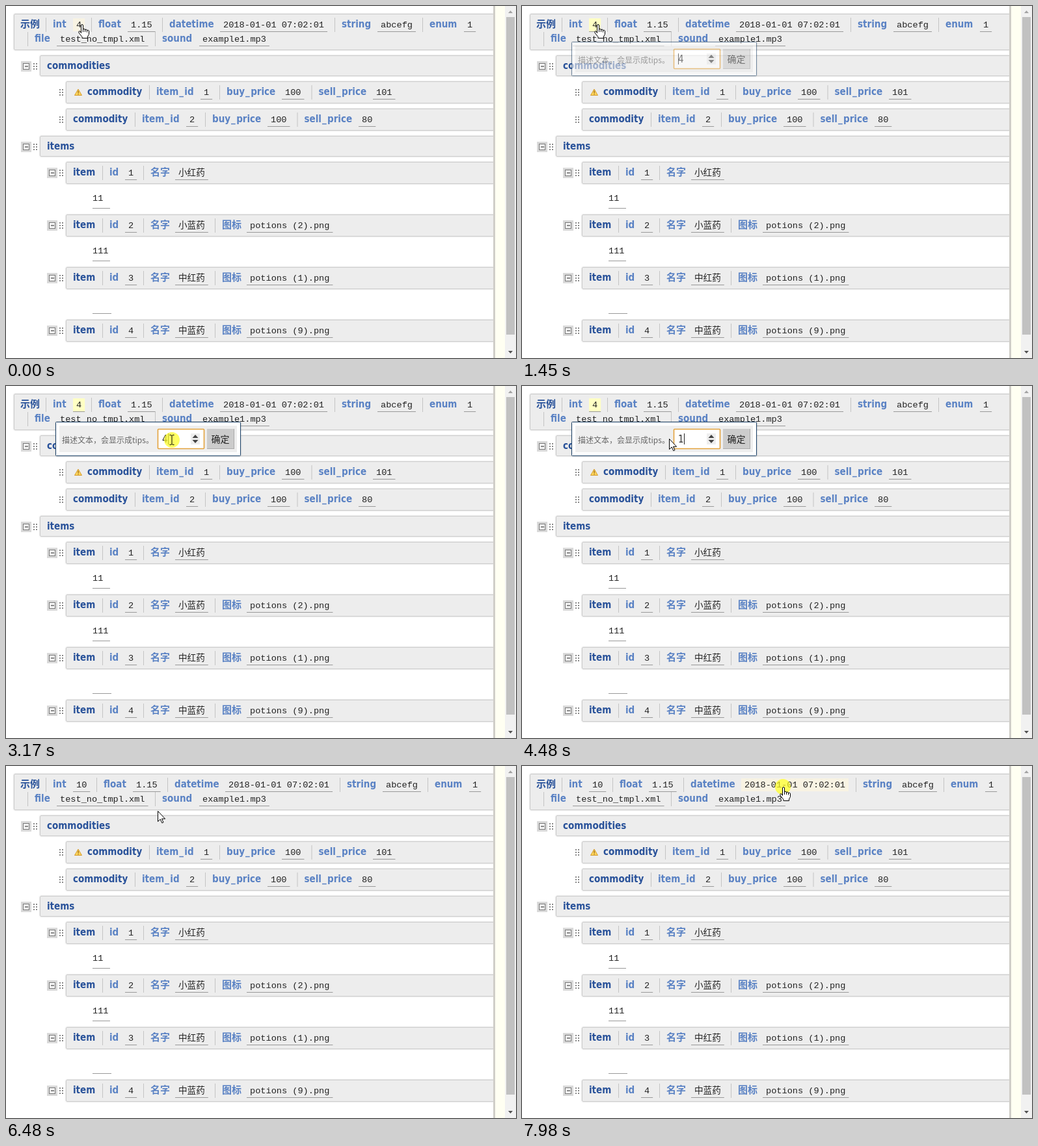
Recreate the animation shown at these times as an HTML page. Size 784 by 542 pixels, loop 8000 ms.

```html
<!DOCTYPE html>
<html lang="zh">
<head>
<meta charset="utf-8">
<style>
html, body { margin: 0; width: 100%; height: 100%; overflow: hidden; background: #fff; }
svg { display: block; }
text { white-space: pre; font-family: "DejaVu Sans Condensed", "Noto Sans", "Noto Sans CJK SC", sans-serif; font-size: 15px; }
.node { font-weight: bold; fill: #29529a; }
.attr { font-weight: bold; fill: #5a82c4; }
.val { font: 13.6px "Liberation Mono", "Noto Sans CJK SC", monospace; fill: #222; }
.cjk { font-family: "Noto Sans CJK SC", sans-serif; }
</style>
</head>
<body>
<svg id="stage" width="784" height="542" viewBox="0 0 784 542"></svg>
<script>
const LOOP = 8000;
const PITCH = 8.16;
const CLOSE = 5370;

const rect = (x, y, w, h, fill, more = '') =>
  `<rect x="${x}" y="${y}" width="${w}" height="${h}" fill="${fill}" ${more}/>`;
const path = (d, fill, more = '') => `<path d="${d}" fill="${fill}" ${more}/>`;
const text = (x, y, cls, s, more = '') => `<text x="${x}" y="${y}" class="${cls}" ${more}>${s}</text>`;

// Bold labels leave a little air around each underscore.
const label = (x, y, cls, s) =>
  text(x, y, cls, s.replace(/_(.)/, '<tspan dx="1">_</tspan><tspan dx="1.3">$1</tspan>'));

const valueWidth = s => 10 + [...s].reduce((w, c) => w + (c > '\u2fff' ? 13.6 : PITCH), 0);
const value = (x, y, s, id = '') => {
  const w = valueWidth(s);
  const name = part => id ? `id="${id}${part}"` : '';
  return rect(x, y - 14, w, 20, 'none', name('Bg')) +
    rect(x, y + 6, w, 1, '#999', name('Line')) +
    text(x + 5, y, 'val', s, name('Text'));
};

const field = (x, y, name, vx, s, id) =>
  rect(x - 11, y - 15, 1, 22, '#c4c4c4') + label(x, y, 'attr', name) + value(vx, y, s, id);

const bar = (x, y, h) =>
  rect(x + .5, y + .5, 760 - x, h, '#ededed', 'rx="1.5" stroke="#ccc" filter="url(#soft)"');

const grip = (x, y) => [0, 4].map(dx => [-5, -1, 3].map(dy =>
  rect(x + dx, y + dy, 2, 2, '#888')).join('')).join('');

const toggle = (x, y) => rect(x, y - 8, 16, 16, '#d9d9d9') +
  rect(x + 3.5, y - 4.5, 9, 9, '#f4f4f4', 'stroke="#777"') + rect(x + 6, y - .5, 5, 1, '#222');

const warning = path('M111 128L116.5 137.5H105.5Z', '#ffd75e', 'stroke="#d39a2c" stroke-linejoin="round"') +
  rect(110.5, 130.5, 1.2, 3.8, '#8a5a10') + rect(110.5, 135.2, 1.2, 1.2, '#8a5a10');

function header() {
  return bar(12, 12, 55) + label(22, 33, 'node', '示例') +
    field(72, 33, 'int', 103, '4', 'int') +
    '<g id="rest">' +
    field(142, 33, 'float', 187, '1.15') +
    field(251, 33, 'datetime', 329, '2018-01-01 07:02:01', 'date') +
    field(516, 33, 'string', 571, 'abcefg') +
    field(651, 33, 'enum', 704, '1') + '</g>' +
    field(44, 55, 'file', 78, 'test_no_tmpl.xml') +
    field(240, 55, 'sound', 297, 'example1.mp3');
}

const section = (y, name) =>
  bar(52, y - 16, 31) + toggle(23, y + 1) + grip(42, y + 1) + label(63, y + 5, 'node', name);

const commodity = (y, x, id, buy, sell) =>
  bar(92, y - 16, 33) + grip(82, y + 1) + label(x, y + 5, 'node', 'commodity') +
  field(x + 106, y + 5, 'item_id', x + 174, id) +
  field(x + 214, y + 5, 'buy_price', x + 299, buy) +
  field(x + 355.5, y + 5, 'sell_price', x + 439, sell);

const item = (y, id, name, icon) =>
  bar(92, y - 16, 33) + toggle(63, y + 1) + grip(82, y + 1) + label(103, y + 5, 'node', 'item') +
  field(159, y + 5, 'id', 183, id) + field(222, y + 5, '名字', 260, name) +
  (icon ? field(332, y + 5, '图标', 370, icon) : '');

const note = (y, s, w) => text(133, y, 'val', s) + rect(133, y + 11, w, 1, '#999');

const frameRight = rect(749, 0, 35, 542, '#fffff2') + rect(749, 0, 3, 542, '#d0cec8') +
  rect(767, 0, 17, 542, '#f1f1f1') + rect(769, 17, 13, 489, '#c1c1c1') +
  path('M772 11h7l-3.5-4z', '#a3a3a3') + path('M772 531h7l-3.5 4z', '#505050');

const popup = '<g id="popup">' +
  rect(76.5, 55.5, 284, 52, '#fff', 'rx="1" stroke="#1f4368" filter="url(#soft)"') +
  rect(82, 61, 273, 41, '#eee') +
  text(86, 87.5, 'cjk', '描述文本，会显示成tips。', 'style="font-size:12px" fill="#666"') +
  rect(233.5, 66.5, 71, 30, '#fff', 'rx="1" stroke="#e3a23c" stroke-width="1.6"') +
  rect(240, 73, 9, 17, '#3399ff', 'id="mark"') +
  text(240, 87, '', '4', 'id="input"') +
  rect(240, 73, 1, 17, '#222', 'id="caret"') +
  rect(284, 73, 14, 17, '#eee') +
  path('M286.5 80h9l-4.5-5zM286.5 83h9l-4.5 5z', '#444') +
  rect(309, 66, 42, 31, '#aaa') + rect(309, 66, 41, 30, '#ccc') +
  text(315.5, 87, 'cjk', '确定', 'style="font-size:14px" fill="#222"') + '</g>';

const ink = 'stroke="#000" stroke-linejoin="round"';
const cursors = '<g id="cursor"><g id="hand">' +
  path('M-.5 13.5V2Q-.5.5 1 .5T2.5 2V8.5Q2.5 7.2 4 7.2T5.5 9Q5.7 8 7 8T8.5 10Q9 9 10.2 9.2T11.5 11V15.5L9.5 19V21.5H1V19.5L-3.5 14Q-5 11.5-3.5 10.7T-.5 13.5Z', '#fff', ink) +
  path('M2.5 8V12M5.5 9V12M8.5 10V12.5', 'none', ink) + '</g>' +
  path('M.5 .5V16.5L4.2 13L6.8 18.7L9 17.7L6.5 12.3H11.6Z', '#fff', ink + ' id="arrow"') +
  path('M-3.5-7.5H-1.5L0-6.5L1.5-7.5H3.5M0-6.5V6.5M-3.5 7.5H-1.5L0 6.5L1.5 7.5H3.5', 'none', ink + ' id="beam"') + '</g>';

document.getElementById('stage').innerHTML =
  '<defs><filter id="soft" x="-5%" y="-20%" width="110%" height="140%">' +
  '<feDropShadow dx="0" dy="0" stdDeviation="1" flood-opacity=".2"/></filter></defs>' +
  header() + section(92, 'commodities') +
  commodity(132, 125, '1', '100', '101') + warning +
  commodity(174, 103, '2', '100', '80') +
  section(216, 'items') +
  item(256, '1', '小红药') + note(300, '11', 27) +
  item(337, '2', '小蓝药', 'potions (2).png') + note(381, '111', 27) +
  item(418, '3', '中红药', 'potions (1).png') + note(462, '', 29) +
  item(499, '4', '中蓝药', 'potions (9).png') +
  frameRight + popup +
  '<circle id="click" r="12" fill="#ffff20" opacity=".7"/>' + cursors;

const el = {};
document.querySelectorAll('[id]').forEach(e => el[e.id] = e);
const set = (id, k, v) => el[id].setAttribute(k, v);
const show = (id, on) => set(id, 'visibility', on ? 'inherit' : 'hidden');

// start, end, steps, from x y, to x y, bow
const moves = [
  [0, 1, 1, 116, 28, 116, 28, 0],
  [1900, 2290, 6, 127, 47, 258, 68, 14],
  [2440, 2500, 2, 257, 69, 255, 71, 0],
  [2800, 2860, 2, 255, 76, 255, 83, 0],
  [3170, 3320, 3, 255, 83, 226, 81, 0],
  [6480, 6530, 2, 233, 69, 235, 67, 0],
  [6760, 7130, 6, 234, 60, 217, 29, 0],
  [7450, 7830, 6, 235, 30, 401, 32, 3]
];

function pointer(t) {
  const [a, b, n, x0, y0, x1, y1, bow] = moves.filter(m => m[0] <= t).pop();
  const k = Math.min(n - 1, Math.floor((t - a) / (b - a) * (n - 1) + 1e-6));
  const u = n > 1 ? k / (n - 1) : 0;
  return [x0 + (x1 - x0) * u, y0 + (y1 - y0) * u + bow * Math.sin(Math.PI * u)];
}

const within = (t, ...spans) => spans.some(([a, b]) => t >= a && t < b);

function draw(t) {
  const open = within(t, [1300, CLOSE]);
  const [x, y] = pointer(t);

  const done = t >= 5320;
  const w = valueWidth(done ? '10' : '4');
  el.intText.textContent = done ? '10' : '4';
  set('intBg', 'width', w);
  set('intLine', 'width', w);
  set('intBg', 'fill', t < 1300 ? '#f8f3e3' : open ? '#ffffc4' : 'none');
  show('intLine', t >= 1300);
  set('rest', 'transform', `translate(${done ? 8 : 0})`);

  const hover = x >= 337;
  set('dateBg', 'fill', hover ? '#f8f3e3' : 'none');
  show('dateLine', !hover);

  show('popup', open);
  set('popup', 'opacity', Math.min(1, Math.max(0, (t - 1270) / 300)));
  const selected = within(t, [3245, 4480]);
  el.input.textContent = t < 4480 ? '4' : t < 4560 ? '1' : '10';
  set('input', 'fill', selected ? '#fff' : '#333');
  show('mark', selected);
  show('caret', within(t, [1370, 1980], [2440, 3245], [4480, 5070]));
  set('caret', 'x', t < 3030 ? 240 : t < 4560 ? 249 : 257);

  show('click', within(t, [1130, 1300], [3030, 3550], [7980, LOOP]));
  set('click', 'cx', x);
  set('click', 'cy', y);
  set('cursor', 'transform', `translate(${x} ${y})`);
  const hand = t < 1900 || hover;
  const beam = !hand && open && x >= 233;
  show('hand', hand);
  show('beam', beam);
  show('arrow', !hand && !beam);
}

const start = performance.now();
function tick() {
  draw((performance.now() - start) % LOOP);
  requestAnimationFrame(tick);
}
draw(0);
requestAnimationFrame(tick);
</script>
</body>
</html>
```
